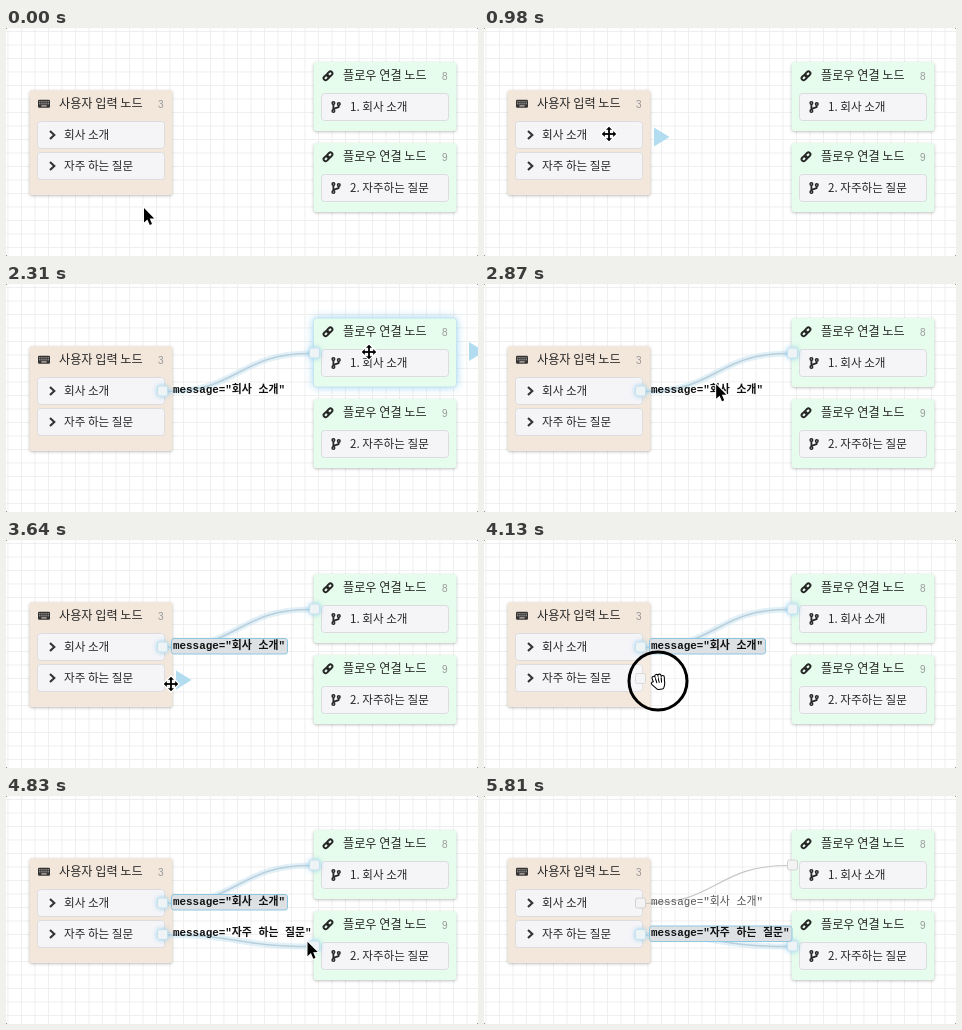
Animation of 472x228 px, one loop 7000 ms. Source, as an HTML page with a canvas:

```html
<!DOCTYPE html>
<html lang="ko">
<head>
<meta charset="utf-8">
<style>
html, body { margin: 0; width: 100%; height: 100%; overflow: hidden; background: #fff; }
canvas { display: block; width: 472px; height: 228px; }
</style>
</head>
<body>
<canvas id="stage"></canvas>
<script>
const W = 472, H = 228, LOOP = 7000, STEP = 70;
const canvas = document.getElementById('stage');
const c = canvas.getContext('2d');
const dpr = window.devicePixelRatio || 1;
canvas.width = W * dpr;
canvas.height = H * dpr;

const SANS = '"Noto Sans CJK KR", "Noto Sans KR", "Noto Sans CJK", sans-serif';
const MONO = '"Liberation Mono", "Noto Sans CJK KR", "Noto Sans CJK", monospace';
const GLOW = 'rgba(120, 195, 235, 0.75)';
const INK = '#262626';

// time, x, y of the pointer
const path = [
  [0, 138, 180], [70, 137, 176], [490, 86, 92], [630, 106, 110], [770, 114, 108],
  [980, 125, 106], [1400, 174, 107], [1680, 174, 107], [2100, 363, 68], [2310, 363, 68],
  [3010, 217, 104], [3220, 217, 104], [3640, 165, 144], [3780, 167, 143], [3920, 174, 141],
  [4130, 174, 141], [4410, 320, 152], [4550, 336, 151], [4690, 336, 151], [5040, 238, 136],
  [5390, 238, 136], [5740, 290, 246]
];

const nodes = [
  { x: 23.5, y: 62, h: 105, fill: '#f3e7db', title: '사용자 입력 노드', num: '3', icon: keyboard, rowIcon: chevron,
    rows: ['회사 소개', '자주 하는 질문'], textX: 58 },
  { x: 307.5, y: 34, h: 69, fill: '#e6fcec', title: '플로우 연결 노드', num: '8', icon: chain, rowIcon: branch,
    rows: ['1. 회사 소개'], textX: 344 },
  { x: 307.5, y: 115, h: 69, fill: '#e6fcec', title: '플로우 연결 노드', num: '9', icon: chain, rowIcon: branch,
    rows: ['2. 자주하는 질문'], textX: 344 }
];

const links = [
  { y: 107, end: 69, press: 1540, drag: 1750, drop: 2310, click: 3080, off: 5320, text: 'message="회사 소개"', w: 116, node: nodes[1] },
  { y: 138.5, end: 150, press: 4060, drag: 4200, drop: 4550, click: 5250, off: 9999, text: 'message="자주 하는 질문"', w: 142.5, node: nodes[2] }
];

const within = (t, a, b) => t >= a && t < b;

function pointer(t) {
  for (let i = 1; i < path.length; i++) {
    const [t0, x0, y0] = path[i - 1], [t1, x1, y1] = path[i];
    if (t <= t1) {
      const u = (t - t0) / (t1 - t0), k = u * u * (3 - 2 * u);
      return { x: x0 + (x1 - x0) * k, y: y0 + (y1 - y0) * k };
    }
  }
  return null;
}

function box(x, y, w, h, r, fill, stroke) {
  c.beginPath();
  c.roundRect(x, y, w, h, r);
  if (fill) { c.fillStyle = fill; c.fill(); }
  if (stroke) { c.strokeStyle = stroke; c.lineWidth = 1; c.stroke(); }
}

function text(str, x, y, font, color) {
  c.font = font;
  c.fillStyle = color;
  c.fillText(str, x, y);
}

function line(points, width, color, close) {
  c.beginPath();
  points.forEach(([x, y]) => c.lineTo(x, y));
  if (close) c.closePath();
  c.lineWidth = width;
  c.strokeStyle = color;
  c.stroke();
}

function shadow(color, blur, dy = 0) {
  c.shadowColor = color;
  c.shadowBlur = blur * dpr;
  c.shadowOffsetY = dy * dpr;
}

const noShadow = () => shadow('transparent', 0);

function grid() {
  c.fillStyle = '#fff';
  c.fillRect(0, 0, W, H);
  c.fillStyle = '#eee';
  for (let x = 1.5; x < W; x += 13.5) c.fillRect(x, 0, 0.9, H);
  for (let y = 3; y < H; y += 13.5) c.fillRect(0, y, W, 0.9);
  c.fillStyle = '#999';
  for (const x of [0, W - 1]) for (const y of [0, H - 1]) c.fillRect(x, y, 1, 1);
}

function keyboard(x, y) {
  box(x - 6, y - 4, 12, 8, 1.2, '#333');
  c.fillStyle = '#e8ddd2';
  for (let i = 0; i < 5; i++) {
    c.fillRect(x - 4.7 + i * 2.1, y - 2.5, 1, 1);
    c.fillRect(x - 4.7 + i * 2.1, y - 0.5, 1, 1);
  }
  c.fillRect(x - 2.6, y + 1.6, 5.2, 1);
}

function chain(x, y) {
  c.save();
  c.translate(x, y);
  c.rotate(-Math.PI / 4);
  c.lineWidth = 1.9;
  c.strokeStyle = INK;
  for (const dx of [-5.4, -0.6]) {
    c.beginPath();
    c.roundRect(dx, -2, 6, 4, 2);
    c.stroke();
  }
  c.restore();
}

function chevron(x, y) {
  line([[x - 2, y - 4], [x + 2.3, y], [x - 2, y + 4]], 2.1, '#333');
}

function branch(x, y) {
  line([[x - 2.6, y - 4], [x - 2.6, y + 4]], 1.8, INK);
  line([[x + 2.8, y - 3], [x + 2.6, y], [x - 2.4, y + 1.8]], 1.8, INK);
  for (const [dx, dy] of [[-2.6, -4], [-2.6, 4], [2.8, -3]]) {
    c.beginPath();
    c.arc(x + dx, y + dy, 1.3, 0, 7);
    c.fillStyle = '#f5f5f8';
    c.fill();
    c.lineWidth = 1.5;
    c.strokeStyle = INK;
    c.stroke();
  }
}

function drawNode(n, hover) {
  if (hover) shadow(GLOW, 8);
  else shadow('rgba(0, 0, 0, 0.25)', 3, 1);
  box(n.x, n.y, 143, n.h, 3, n.fill);
  noShadow();
  if (hover) box(n.x, n.y, 143, n.h, 3, null, '#c4e6f2');
  n.icon(n.x + 14.5, n.y + 13.8);
  text(n.title, n.x + 29.5, n.y + 18, '12.15px ' + SANS, INK);
  text(n.num, n.x + 128.5, n.y + 17.5, '10px "Liberation Sans", sans-serif', '#999');
  n.rows.forEach((row, i) => {
    const y = n.y + 31.5 + i * 31;
    box(n.x + 8, y, 127, 27, 3, '#f5f5f8', '#dcdce0');
    n.rowIcon(n.x + 22.5, y + 13.5);
    text(row, n.textX, y + 17.6, '11.6px ' + SANS, INK);
  });
}

function triangle(x, y) {
  c.beginPath();
  c.moveTo(x, y - 9.5);
  c.lineTo(x + 15.5, y);
  c.lineTo(x, y + 9.5);
  c.closePath();
  c.fillStyle = '#b2dcf0';
  c.fill();
}

function handle(x, y, lit) {
  if (lit) {
    shadow(GLOW, 5);
    box(x - 5.5, y - 5.5, 11, 11, 2.5, '#dceef6');
    noShadow();
  }
  box(x - 5, y - 5, 10, 10, 2, lit ? '#eef4f6' : '#f3f3f3', lit ? '#c2e0ed' : '#d2d2d2');
}

function curve(x0, y0, x1, y1, lit) {
  const m = (x0 + x1) / 2;
  c.beginPath();
  c.moveTo(x0, y0);
  c.bezierCurveTo(m, y0, m, y1, x1, y1);
  if (lit) {
    c.lineWidth = 6;
    c.strokeStyle = 'rgba(190, 224, 240, 0.45)';
    c.stroke();
  }
  c.lineWidth = lit ? 1.6 : 1.2;
  c.strokeStyle = lit ? '#b9d0dc' : '#c6c6c6';
  c.stroke();
}

function drawLink(l, t, p) {
  if (t < l.press) return;
  const made = t >= l.drop, lit = t >= l.drag && t < l.off;
  const snap = made || (p && p.x > 307);
  if (t >= l.drag) {
    if (snap) curve(161, l.y + 0.5, 304, l.end + 0.5, lit);
    else curve(161, l.y + 0.5, p.x, p.y, true);
  }
  handle(156.5, l.y, made && lit);
  if (snap) handle(308.5, l.end, made && lit);
  if (!made) return;
  if (lit && t >= l.click) box(165.5, l.y - 8.5, l.w, 15.5, 2.5, '#dde1e4', '#8fc6e0');
  text(l.text, 167, l.y + 1.5, (lit ? 'bold ' : '') + '10.9px ' + MONO, lit ? '#111' : '#555');
}

function ring(x, y) {
  c.beginPath();
  c.arc(x, y, 29, 0, Math.PI * 2);
  c.fillStyle = 'rgba(255, 255, 255, 0.15)';
  c.fill();
  c.lineWidth = 3;
  c.strokeStyle = '#000';
  c.stroke();
}

function arrow() {
  const shape = [[0, 0], [0, 14.5], [3.4, 11.4], [5.8, 17], [8, 16], [5.7, 10.6], [10.2, 10.4]];
  line(shape, 2, '#fff', true);
  c.fillStyle = '#000';
  c.fill();
}

function move() {
  for (const [color, grow] of [['#fff', 2.2], ['#000', 0]]) {
    for (let i = 0; i < 4; i++) {
      line([[0, 0], [0, -5]], 1.8 + grow, color);
      line([[0, -7], [2.5, -4.4], [-2.5, -4.4]], 0.5 + grow, color, true);
      c.fillStyle = color;
      c.fill();
      c.rotate(Math.PI / 2);
    }
  }
}

// tops: upper end of each finger
function hand(tops) {
  const palm = [[-3.2, 1], [4.4, 1], [4, 3.5], [2.8, 6], [-1.2, 6], [-5.6, 0.8]];
  c.translate(0.5, 0.8);
  c.rotate(-0.15);
  c.lineCap = c.lineJoin = 'round';
  for (const [color, width] of [['#000', 4.4], ['#fff', 2.3]]) {
    tops.forEach((y, i) => line([[-4.2 + i * 3, y], [-2.8 + i * 2.3, 2]], width, color));
    line(palm, width, color, true);
    c.fillStyle = '#fff';
    c.fill();
  }
  for (let i = 0; i < 3; i++) line([[-2.5 + i * 2.8, -3], [-1.8 + i * 2.4, 0.8]], 1, '#000');
  c.lineCap = 'butt';
  c.lineJoin = 'miter';
}

function drawPointer(p, t) {
  c.save();
  c.translate(p.x, p.y);
  const open = [-4.5, -6, -5.8, -4], fist = [-2.8, -3.6, -3.4, -2.6], point = [-6.5, -2.2, -2, -1.4];
  const onNode = nodes.some(n => p.x > n.x && p.x < n.x + 143 && p.y > n.y && p.y < n.y + n.h);
  if (within(t, 1540, 2310)) hand(fist);
  else if (within(t, 1330, 1540) || within(t, 3850, 4550)) hand(open);
  else if (within(t, 2940, 3360) || within(t, 4970, 5460)) hand(point);
  else if (onNode) move();
  else arrow();
  c.restore();
}

function draw(t) {
  c.setTransform(dpr, 0, 0, dpr, 0, 0);
  grid();
  const p = pointer(t);
  nodes.forEach(n => {
    const l = links.find(k => k.node === n);
    const over = l && p && p.x > n.x && within(t, l.drop - 210, l.drop + 700);
    drawNode(n, over && (l === links[0] || t >= l.drop));
    if (over && t >= l.drop) triangle(463, n.y + 33.5);
  });
  if (within(t, 840, 1540)) triangle(170, 109);
  if (within(t, 3500, 4060)) triangle(170, 140);
  links.forEach(l => drawLink(l, t, p));
  if (!p) return;
  if (within(t, 1540, 2310) || within(t, 4060, 4550)) ring(p.x, p.y);
  if (within(t, 3080, 3220) || within(t, 5250, 5390)) ring(p.x, p.y - 1.5);
  drawPointer(p, t);
}

const start = performance.now();
function frame() {
  const t = (performance.now() - start) % LOOP;
  draw(Math.floor(t / STEP) * STEP);
  requestAnimationFrame(frame);
}
frame();
</script>
</body>
</html>
```
